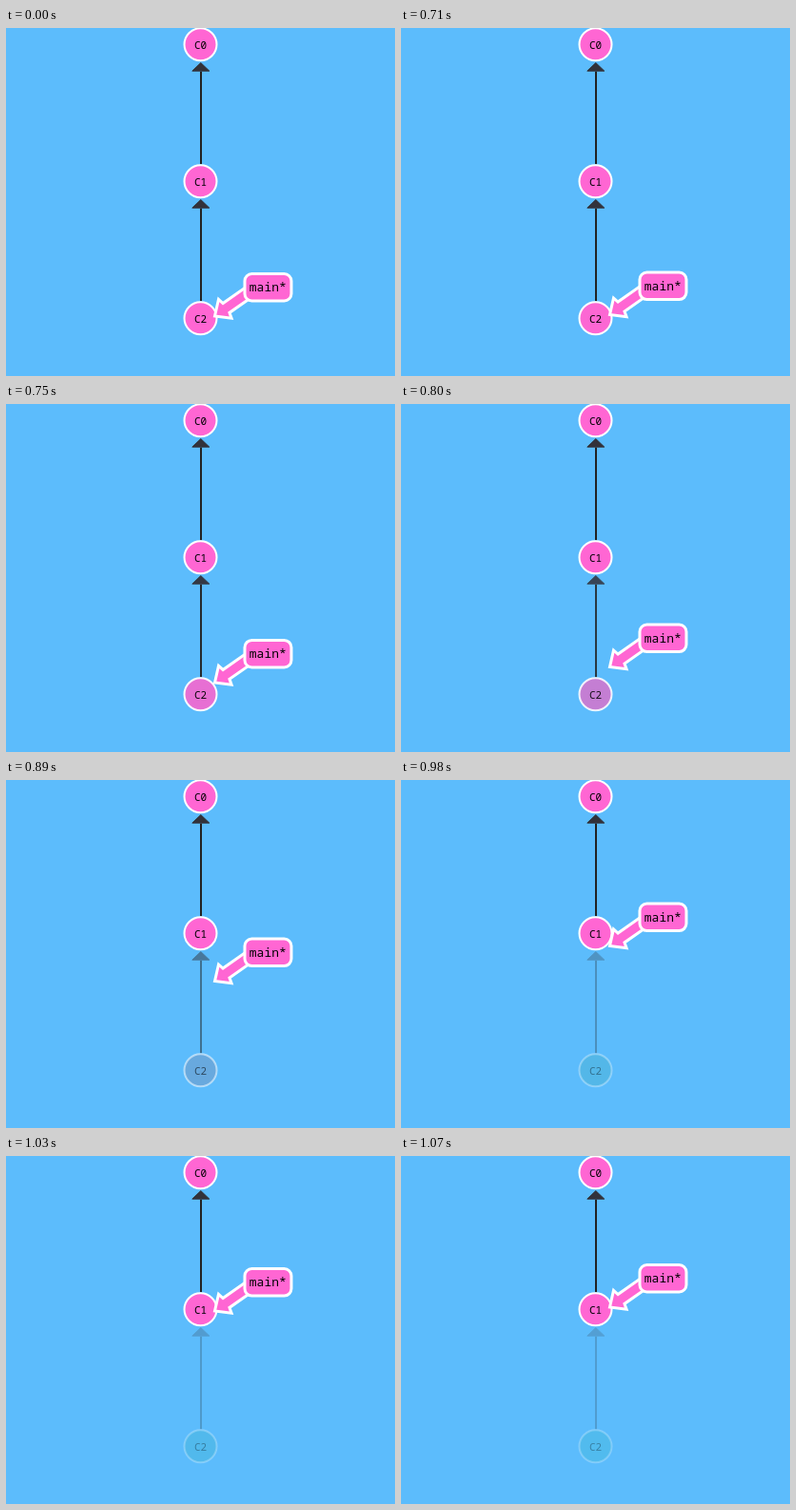
An HTML page that plays this animation: 409x366 px, repeating every 2030 ms.

```html
<!DOCTYPE html>
<html lang="en">
<head>
<meta charset="utf-8">
<title>Branch moves back</title>
<style>
  html, body { margin: 0; width: 100%; height: 100%; overflow: hidden; background: #5cbcfc; }
  svg { display: block; }
  text { font-family: "Noto Sans Mono", "DejaVu Sans Mono", monospace; text-anchor: middle; fill: #000; }
  .commit circle { stroke: #fff; stroke-width: 2; fill: #ff66d3; }
  .commit text { font-size: 11px; font-weight: 500; }
  .edge line { stroke: #222; stroke-width: 2; }
  .edge path { fill: #32323a; stroke: #32323a; stroke-width: 1; stroke-linejoin: round; }
  #tag path, #tag rect { fill: #ff66d3; stroke: #fff; stroke-width: 3; }
  #tag text { font-size: 13px; }
</style>
</head>
<body>
<svg id="stage" width="409" height="366" viewBox="0 0 409 366">
  <g id="graph"></g>
  <g id="tag">
    <path d="M219.5 303 L223.5 285.4 L228.1 289.5 L258 268.5 L265 278.4 L235 299.4 L237.1 305.2 Z"/>
    <rect x="251" y="258.5" width="49" height="28.5" rx="7.5"/>
    <text x="275.3" y="277">main*</text>
  </g>
</svg>
<script>
const LOOP = 2030;
const GAP = 144;
const X = 204.5;
const PINK = [255, 102, 211];
const TEAL = [36, 178, 178];

// [time in ms, phase of the move]; the picture holds between steps
const STEPS = [[0, 0], [710, .064], [750, .17], [800, .282], [840, .43],
               [890, .587], [980, .787], [1030, .893], [1070, 1]];

const mix = (a, b, p) => a + (b - a) * p;
const ease = u => (1 - Math.cos(Math.PI * u)) / 2;
const commitY = i => 17.3 + i * GAP;

function edge(i) {
  const y = commitY(i);
  return `<g class="edge" id="edge${i}">
    <line x1="205" x2="205" y1="${y + 28.5}" y2="${y + GAP - 18}"/>
    <path d="M${X + .3} ${y + 19.3} l9 8.6 h-18 Z"/></g>`;
}

function commit(i) {
  const y = commitY(i);
  return `<g class="commit" id="commit${i}">
    <circle cx="${X}" cy="${y}" r="17"/>
    <text x="${X}" y="${y + 4.5}">C${i}</text></g>`;
}

document.getElementById("graph").innerHTML =
  [0, 1].map(edge).join("") + [0, 1, 2].map(commit).join("");

const tag = document.getElementById("tag");
const oldEdge = document.getElementById("edge1");
const oldDot = document.querySelector("#commit2 circle");
const oldText = document.querySelector("#commit2 text");

function draw(ms) {
  const t = ms % LOOP;
  const p = ease(STEPS.filter(s => s[0] <= t).pop()[1]);
  const fade = mix(1, .2, p);
  const fill = PINK.map((c, i) => Math.round(mix(c, TEAL[i], p)));

  tag.setAttribute("transform", `translate(0 ${-GAP * p})`);
  oldEdge.setAttribute("opacity", fade);
  oldDot.style.fill = `rgb(${fill})`;
  oldDot.style.fillOpacity = fade;
  oldDot.style.strokeOpacity = mix(1, .25, p);
  oldText.setAttribute("opacity", mix(1, .3, p));
}

const start = performance.now();
function tick() {
  draw(performance.now() - start);
  requestAnimationFrame(tick);
}
tick();
</script>
</body>
</html>
```
